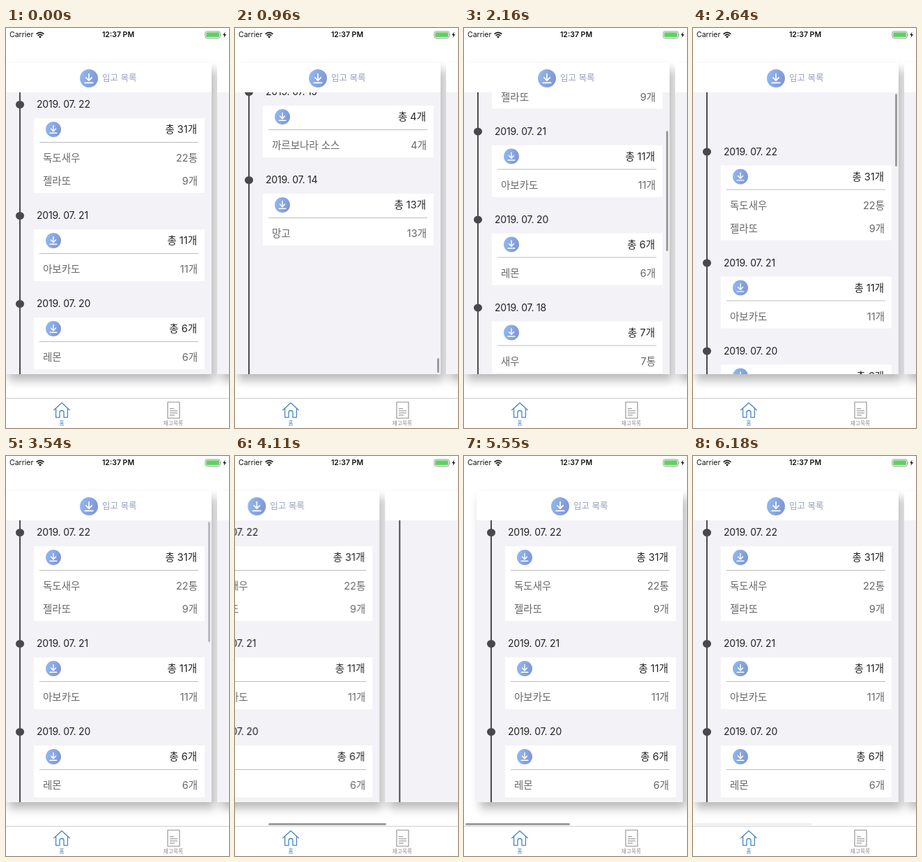
Write an HTML page that moves like this. It is 320 by 572 pixels and loops after 6.21 s.

```html
<!DOCTYPE html>
<html lang="ko">
<head>
<meta charset="utf-8">
<style>
html, body { margin: 0; width: 100%; height: 100%; overflow: hidden; background: #fff; }
body { font-family: Inter, "Noto Sans CJK KR", "Noto Sans CJK", sans-serif; }
#stage { position: absolute; left: 0; top: 0; width: 320px; height: 572px; overflow: hidden; background: #fff; }
#stage div, #stage svg, #stage i { position: absolute; }
#stage span { position: absolute; white-space: nowrap; line-height: 20px; }
svg { overflow: visible; }
#pages { left: 0; top: 0; width: 320px; height: 529px; will-change: transform; }
.page { top: 50px; width: 296px; height: 445px; background: #fff; box-shadow: 5px 9px 13px rgba(0, 0, 0, .28); }
.head { top: 12px; font-size: 12.5px; }
.list { left: 0; top: 41.5px; width: 296px; height: 403.5px; overflow: hidden; background: #f3f2f7; }
.line { left: 20px; top: 0; width: 2px; height: 404px; background: #4a494c; }
.dot { left: 15px; width: 12px; height: 10.5px; border-radius: 50%; background: #49484b; }
.date { left: 45px; font-size: 14px; letter-spacing: -.2px; color: #222; }
.card { left: 41px; width: 245px; background: #fff; }
.card i { left: 8px; top: 34.5px; width: 228px; height: 1px; background: #bcbcbc; }
.card span { font-size: 14.5px; color: #686868; }
.card .total { right: 11px; color: #242424; }
.name { left: 13px; }
.count { right: 10px; }
.bar { border-radius: 2px; background: #9c9c9f; }
#barY { left: 291px; width: 2.5px; }
#barX { top: 525px; height: 2.5px; }
#status { left: 0; top: 0; width: 320px; height: 20px; font-size: 11px; color: #111; }
#tabs { left: 0; top: 529px; width: 320px; height: 43px; background: #fff; border-top: 1px solid #cfcfcf; box-sizing: border-box; }
#tabs span { top: 26px; width: 60px; text-align: center; font-size: 7.7px; }
</style>
</head>
<body>
<div id="stage">
  <div id="pages"></div>
  <div id="barX" class="bar"></div>
  <div id="status">
    <span style="left:5px;top:0;font-size:10.5px">Carrier</span>
    <svg style="left:43px;top:5px" width="12" height="10" fill="none" stroke="#111" stroke-width="1.7">
      <path d="M.6 3.6Q6-1 11.4 3.6M2.6 5.9Q6 3 9.4 5.9"/><path d="M4 7.4Q6 5.8 8 7.4L6 9.5Z" fill="#111" stroke="none"/>
    </svg>
    <span style="left:111px;width:100px;text-align:center;top:0;font-size:10.5px;font-weight:600">12:37 PM</span>
    <svg style="left:285px;top:4px" width="32" height="12">
      <rect x=".9" y=".9" width="21.4" height="9.6" rx="2.4" fill="none" stroke="#8c8c8c" stroke-width=".9"/>
      <rect x="2.3" y="2.3" width="18.6" height="6.8" rx="1.2" fill="#61cf63"/>
      <path d="M23.3 4q1.6 1.7 0 3.4z" fill="#8c8c8c"/>
      <path d="M29.6 1.4L26.2 6.2H28.4L27.6 10L31 5H28.7Z" fill="#111"/>
    </svg>
  </div>
  <div id="tabs">
    <svg style="left:68px;top:5px" width="24" height="23" fill="none" stroke="#4686c2" stroke-width="1.3" stroke-linejoin="round" stroke-linecap="round">
      <path d="M.8 11.2L12 1 23.2 11.2M3.6 9V21.8H9V15Q9 12 12 12T15 15V21.8H20.4V9"/>
    </svg>
    <span style="left:50px;color:#3f80c0">홈</span>
    <svg style="left:231px;top:4px" width="19" height="25" fill="none" stroke="#8d8d8d" stroke-width="1.1">
      <path d="M1 1H18V24H1ZM4 10.5H10M4 13.5H15M4 16.5H15M4 19.5H11"/>
    </svg>
    <span style="left:210px;color:#8a8a8a">재고목록</span>
  </div>
</div>
<script>
const LOOP = 6210, STEP = 30;
const MAX_Y = 511, MAX_X = 279;

const days = [
  ['22', 31, ['독도새우', '22통'], ['젤라또', '9개']],
  ['21', 11, ['아보카도', '11개']],
  ['20', 6, ['레몬', '6개']],
  ['18', 7, ['새우', '7통']],
  ['16', 5, ['치즈', '5개']],
  ['15', 4, ['까르보나라 소스', '4개']],
  ['14', 13, ['망고', '13개']]
];

// [time, position]; each leg eases in and out
const scrollY = [[690, 0], [960, 681], [1530, MAX_Y], [1740, MAX_Y], [2454, -80], [3120, 0]];
const scrollX = [[3880, 0], [4460, MAX_X], [5060, MAX_X], [5540, -19], [5990, 0]];
const fadeY = [[660, 0], [720, 1], [3450, 1], [3670, 0]];
const fadeX = [[3860, 0], [3930, 1], [4660, 1], [4890, 0], [5040, 0], [5100, 1], [6030, 1], [6240, 0]];

const $ = id => document.getElementById(id);
const ease = p => p < .5 ? 2 * p * p : 1 - 2 * (1 - p) ** 2;

function at(track, t) {
  const i = track.findIndex(k => k[0] > t);
  if (i < 0) return track[track.length - 1][1];
  if (i === 0) return track[0][1];
  const [t0, a] = track[i - 1], [t1, b] = track[i];
  return a + (b - a) * ease((t - t0) / (t1 - t0));
}

function badge(kind, x, y, r) {
  const down = kind === 'in';
  const [c0, c1] = down ? ['#92bbf5', '#8098d6'] : ['#e0696b', '#b65a62'];
  const arrow = down
    ? 'M0-6.5V3M-4.2-1.2L0 3.2 4.2-1.2M-5.8 6.3H5.8'
    : 'M0 3.5V-6.5M-3.6-3L0-6.7 3.6-3M-3.2-.6H-6V6.3H6V-.6H3.2';
  const id = kind + r;
  return `<svg style="left:${x - r}px;top:${y - r}px" width="${2 * r}" height="${2 * r}" viewBox="-13 -13 26 26">
    <linearGradient id="${id}" x2="1" y2=".3"><stop stop-color="${c0}"/><stop offset="1" stop-color="${c1}"/></linearGradient>
    <circle r="13" fill="url(#${id})"/>
    <path d="${arrow}" fill="none" stroke="#fff" stroke-width="1.7" stroke-linecap="round" stroke-linejoin="round"/></svg>`;
}

function buildDays() {
  let y = 17.5;
  return days.map(([day, total, ...items]) => {
    const rows = items.map(([name, count], i) => {
      const top = 47.5 + i * 33;
      return `<span class="name" style="top:${top}px">${name}</span><span class="count" style="top:${top}px">${count}</span>`;
    }).join('');
    const html = `<div class="dot" style="top:${y - 5}px"></div>
      <span class="date" style="top:${y - 10}px">2019. 07. ${day}</span>
      <div class="card" style="top:${y + 19.5}px;height:${41 + 33 * items.length}px">
      ${badge('in', 28, 16.5, 11)}<span class="total" style="top:6.5px">총 ${total}개</span><i></i>${rows}</div>`;
    y += 93 + 33 * items.length;
    return html;
  }).join('');
}

function page(left, kind, title, color, body) {
  return `<div class="page" style="left:${left}px">${badge(kind, 120, 22, 13)}
    <span class="head" style="left:139px;color:${color}">${title}</span>
    <div class="list"><div class="line"></div>${body}</div></div>`;
}

$('pages').innerHTML =
  page(-1, 'in', '입고 목록', '#939ebf',
    `<div id="days">${buildDays()}</div><div id="barY" class="bar"></div>`) +
  page(303, 'out', '출고 목록', '#a5666c', '');

// The indicator shrinks while the view is pulled past either end
function indicator(pos, max, start, track, size) {
  const over = Math.max(0, -pos, pos - max);
  const len = Math.max(21, size - over);
  const p = Math.min(1, Math.max(0, pos / max));
  return [start + p * (track - len), len];
}

function draw(now) {
  const t = Math.floor(now % LOOP / STEP) * STEP;
  const x = at(scrollX, t), y = at(scrollY, t);
  $('pages').style.transform = `translateX(${-x}px)`;
  $('days').style.transform = `translateY(${-y}px)`;

  const [top, height] = indicator(y, MAX_Y, 2.5, 399, 172);
  Object.assign($('barY').style, { top: top + 'px', height: height + 'px', opacity: at(fadeY, t) });
  const [left, width] = indicator(x, MAX_X, 2, 316, 169);
  Object.assign($('barX').style, { left: left + 'px', width: width + 'px', opacity: at(fadeX, t) });
}

const begin = performance.now();
function loop() {
  draw(performance.now() - begin);
  requestAnimationFrame(loop);
}
loop();
</script>
</body>
</html>
```
